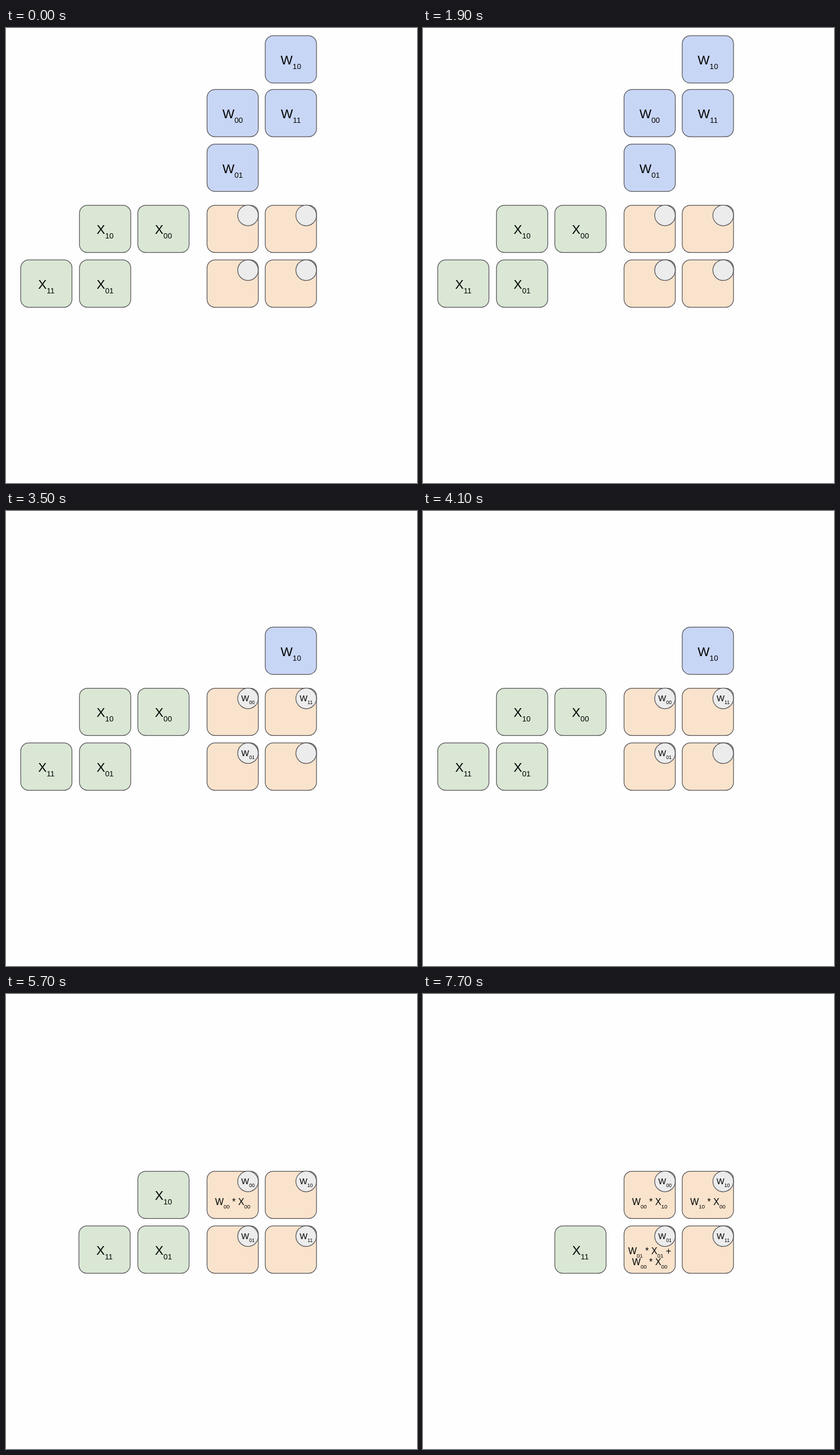
An HTML page for the animation above (8000 ms loop, 712x787 px).

```html
<!DOCTYPE html>
<html lang="en">
<head>
<meta charset="utf-8">
<title>Systolic array</title>
<style>
  html, body { margin: 0; width: 100%; height: 100%; overflow: hidden; background: #fefefe; }
  svg { display: block; width: 712px; height: 787px; }
  rect, circle { stroke: #58565a; stroke-width: 1.25; }
  text { font-family: "Liberation Sans", Arial, sans-serif; text-anchor: middle; fill: #000; }
</style>
</head>
<body>
<svg id="stage" viewBox="0 0 712 787"></svg>
<script>
const LOOP = 8000;
const COLS = [25.5, 126.3, 127.3, 228.4, 348.3, 449.1];
const ROWS = [13.4, 106.3, 200.9, 306.5, 401.2];
const WIDTH = 88.8, HEIGHT = 81.8;
const FILL = { W: '#c8d6f6', X: '#d9e7d4', cell: '#f9e3cc', badge: '#ececec' };

// queue: waiting tiles as [name, column, row]
// cells: four array cells as [weight, ...formula lines], row by row
const steps = [
  { at: 0,
    queue: [['W10', 5, 0], ['W00', 4, 1], ['W11', 5, 1], ['W01', 4, 2],
            ['X10', 2, 3], ['X00', 3, 3], ['X11', 0, 4], ['X01', 2, 4]],
    cells: [[], [], [], []] },
  { at: 2100,
    queue: [['W10', 5, 1], ['W00', 4, 2], ['W11', 5, 2],
            ['X10', 2, 3], ['X00', 3, 3], ['X11', 0, 4], ['X01', 2, 4]],
    cells: [['W01'], [], [], []] },
  { at: 3500,
    queue: [['W10', 5, 2],
            ['X10', 2, 3], ['X00', 3, 3], ['X11', 0, 4], ['X01', 2, 4]],
    cells: [['W00'], ['W11'], ['W01'], []] },
  { at: 5000,
    queue: [['X10', 3, 3], ['X11', 1, 4], ['X01', 3, 4]],
    cells: [['W00', 'W00 * X00'], ['W10'], ['W01'], ['W11']] },
  { at: 6600,
    queue: [['X11', 3, 4]],
    cells: [['W00', 'W00 * X10'], ['W10', 'W10 * X00'],
            ['W01', 'W01 * X01 +', 'W00 * X00'], ['W11']] }
];

// Digits become subscripts
function label(text, x, y, size) {
  const sub = `<tspan font-size="${size * 0.6}" baseline-shift="${-size * 0.355}px">$&</tspan>`;
  return `<text x="${x}" y="${y}" font-size="${size}">${text.replace(/\d+/g, sub)}</text>`;
}

function box(x, y, fill) {
  return `<rect x="${x}" y="${y}" width="${WIDTH}" height="${HEIGHT}" rx="13.8" fill="${fill}"/>`;
}

function tile([name, col, row]) {
  const x = COLS[col], y = ROWS[row];
  return box(x, y, FILL[name[0]]) + label(name, x + WIDTH / 2, y + 49.6, 22);
}

function cell([weight = '', ...lines], i) {
  const x = COLS[4 + i % 2], y = ROWS[3 + (i >> 1)];
  const cx = x + 70.9, cy = y + 17.7;
  const top = lines.length > 1 ? 48.5 : 58;
  return box(x, y, FILL.cell) +
    `<circle cx="${cx}" cy="${cy}" r="17.8" fill="${FILL.badge}"/>` +
    label(weight, cx, cy + 5.2, 14.4) +
    lines.map((line, n) => label(line, x + WIDTH / 2, y + top + n * 19, 15.7)).join('');
}

const stage = document.getElementById('stage');
const start = performance.now();
let shown;

function frame() {
  const time = (performance.now() - start) % LOOP;
  const step = steps.findLast(s => s.at <= time);
  if (step !== shown) {
    stage.innerHTML = step.queue.map(tile).join('') + step.cells.map(cell).join('');
    shown = step;
  }
  requestAnimationFrame(frame);
}
frame();
</script>
</body>
</html>
```
